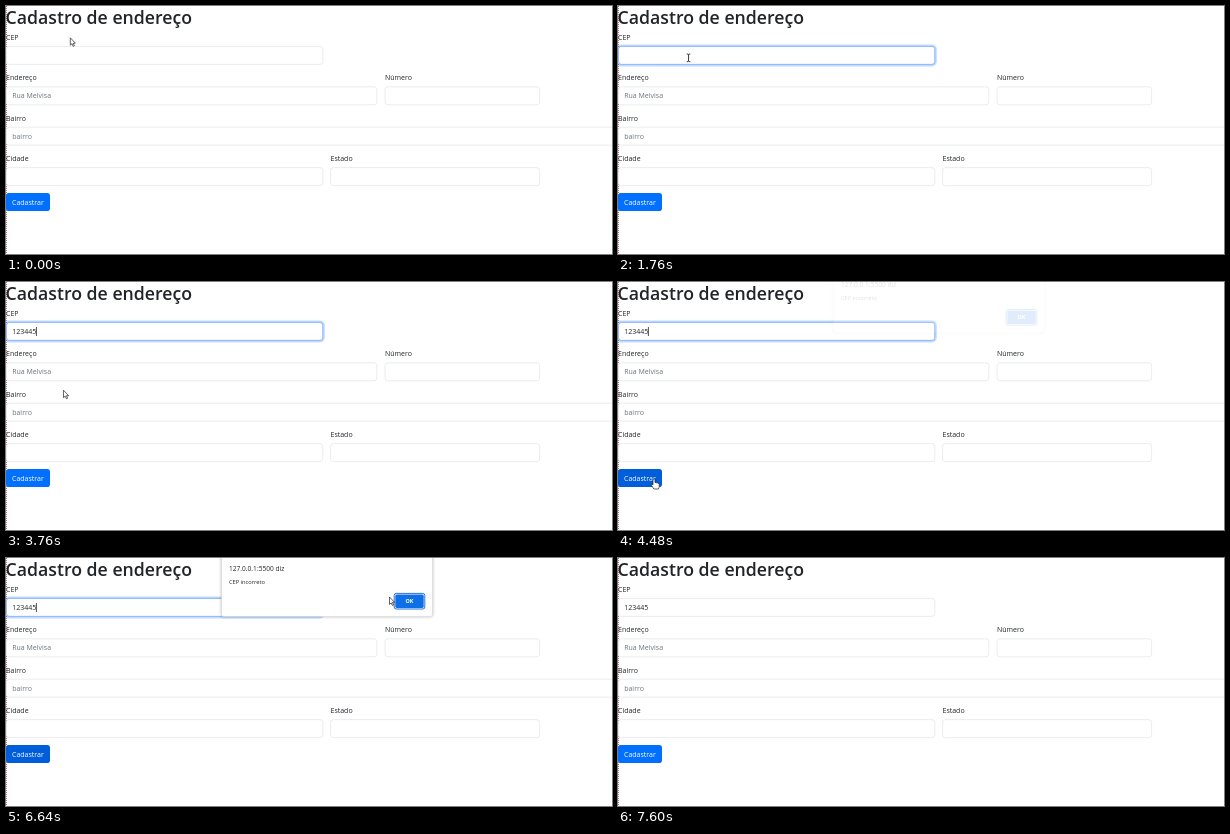
An HTML page that plays this animation: 606x248 px, repeating every 7680 ms.

```html
<!DOCTYPE html>
<html lang="pt-BR">
<head>
<meta charset="utf-8">
<title>Cadastro de endereço</title>
<style>
  html, body { margin: 0; width: 606px; height: 248px; overflow: hidden; background: #fff; }
  svg { display: block; }
  text { font: 7px "Open Sans", "Noto Sans", sans-serif; fill: #212529; }
  .title { font-size: 17.7px; font-weight: 600; }
  .hint { fill: #6c757d; }
  .field { fill: #fff; stroke: #e4e7ea; stroke-width: .8; }
  .light { fill: #fff; }
  .ok { font-size: 5.4px; font-weight: 700; text-anchor: middle; }
  #dialog { filter: drop-shadow(0 .6px 1.4px rgba(0, 0, 0, .28)); }
  #arrow, #hand { fill: #fff; stroke: #222; stroke-width: .7; stroke-linejoin: round; }
  #beam { fill: none; stroke: #222; stroke-width: .9; }
</style>
</head>
<body>
<svg width="606" height="248" viewBox="0 0 606 248">
  <path d="M.5 0V248" stroke="#b5787c" stroke-dasharray="1 1"/>
  <text class="title" x="-.4" y="18">Cadastro de endereço</text>

  <text x="0" y="34">CEP</text>
  <text x="0" y="74.4">Endereço</text>
  <text x="379" y="74.4">Número</text>
  <text x="0" y="114.8">Bairro</text>
  <text x="0" y="155.2">Cidade</text>
  <text x="324.5" y="155.2">Estado</text>

  <rect class="field" x=".4" y="40.4" width="316.4" height="18" rx="2.8"/>
  <rect class="field" x=".4" y="80.8" width="370.4" height="18" rx="2.8"/>
  <rect class="field" x="379" y="80.8" width="154.6" height="18" rx="2.8"/>
  <rect class="field" x=".4" y="121.2" width="620" height="18" rx="2.8"/>
  <rect class="field" x=".4" y="161.6" width="316.4" height="18" rx="2.8"/>
  <rect class="field" x="324.6" y="161.6" width="209" height="18" rx="2.8"/>

  <g id="ring" fill="none">
    <rect x="-.6" y="39.4" width="318.4" height="20" rx="3.8" stroke="#0d6efd" stroke-opacity=".25" stroke-width="2"/>
    <rect x=".4" y="40.4" width="316.4" height="18" rx="2.8" stroke="#86b7fe" stroke-width=".9"/>
  </g>
  <text id="cep" x="6.2" y="52.2"></text>
  <path id="caret" stroke="#222" stroke-width=".8"/>
  <text class="hint" x="6.2" y="92.4">Rua Melvisa</text>
  <text class="hint" x="6.2" y="132.8">bairro</text>

  <rect id="submit" y="187" width="44" height="18" rx="2.8"/>
  <text class="light" x="6" y="198.8">Cadastrar</text>

  <g id="dialog">
    <rect x="215.5" y="-12" width="211" height="70.6" rx="2.5" fill="#fff" stroke="#d4d7da" stroke-width=".6"/>
    <text x="223" y="12.6" style="font-size:6.6px">127.0.0.1:5500 diz</text>
    <text x="223" y="26" style="font-size:5.7px">CEP incorreto</text>
    <rect x="388.2" y="35.4" width="30.6" height="15.6" rx="2" fill="#fff" stroke="#1263d6" stroke-width=".9"/>
    <rect x="389.3" y="36.5" width="28.4" height="13.4" rx="1.4" fill="#0f6fe6"/>
    <text class="light ok" x="403.4" y="45.2">OK</text>
  </g>

  <g id="cursor">
    <path id="arrow" d="M0 0V7.4L1.7 5.9L2.9 8.5L4.1 8L2.9 5.4H5.1Z"/>
    <path id="beam" d="M-1.8-3.8H-.5L0-3.3L.5-3.8H1.8M0-3.3V3.3M-1.8 3.8H-.5L0 3.3L.5 3.8H1.8"/>
    <path id="hand" d="M-1 5V.5Q0-.8 1 .5V3.6Q2.3 3 2.7 3.9Q3.8 3.4 4.2 4.5Q5.3 4.2 5.3 5.6V7.2Q5.2 8.6 4.4 10H-.2Q-1.2 8-2.9 6Q-2.6 4.4-1 5.8Z" transform="translate(0 -1)"/>
  </g>
</svg>
<script>
const LOOP = 7680, STEP = 80;
const FOCUS = 1120, OPEN = 4450, CLOSE = 7120;
const keys = [1920, 2240, 2560, 2880, 3120, 3360];
const value = "123445";
// Pointer stops: time, x, y
const route = [
  [240, 64.3, 31.8], [720, 70.5, 52], [1700, 70.5, 52], [2100, 71.5, 50], [3520, 71.5, 50],
  [4080, 36, 198], [4880, 36, 198], [5440, 290.5, 28], [5760, 290.5, 28],
  [6320, 383.5, 39], [6680, 383.5, 39], [6920, 400, 43]
];

const $ = id => document.getElementById(id);
const ramp = (t, start, length) => Math.min(1, Math.max(0, (t - start) / length));
const show = (id, on) => $(id).setAttribute("visibility", on ? "visible" : "hidden");

function pointer(t) {
  const i = route.findIndex(stop => stop[0] > t);
  if (i < 0) return route.at(-1).slice(1);
  if (i === 0) return route[0].slice(1);
  const [t0, x0, y0] = route[i - 1], [t1, x1, y1] = route[i];
  const p = ramp(t, t0, t1 - t0), e = p * p * (3 - 2 * p);
  return [x0 + (x1 - x0) * e, y0 + (y1 - y0) * e];
}

function draw(t) {
  const modal = t >= OPEN && t < CLOSE;
  const [x, y] = pointer(t);
  const overField = !modal && x < 317 && y > 40 && y < 59;
  const overButton = x < 44 && y > 187 && y < 205;

  const typed = keys.filter(k => k <= t).length;
  $("cep").textContent = value.slice(0, typed);
  $("ring").setAttribute("opacity", ramp(t, FOCUS, 150) - ramp(t, CLOSE, 150));

  const since = t - (typed ? keys[typed - 1] : FOCUS);
  const caretX = 6.4 + (typed ? $("cep").getComputedTextLength() : 0);
  $("caret").setAttribute("d", `M${caretX} 45V54`);
  show("caret", t >= FOCUS && t < CLOSE && (modal || since % 1000 < 500));

  const hover = ramp(t, 3980, 150) - ramp(t, CLOSE, 200);
  const mix = (a, b) => Math.round(a + (b - a) * hover);
  $("submit").setAttribute("fill", `rgb(${mix(2, 0)},${mix(112, 94)},${mix(255, 219)})`);

  const rise = ramp(t, OPEN, 240), fade = ramp(t, CLOSE, 200);
  $("dialog").setAttribute("opacity", rise - fade);
  $("dialog").setAttribute("transform", `translate(0 ${-9 * (1 - rise + fade)})`);

  const visible = t < CLOSE + 160;
  $("cursor").setAttribute("transform", `translate(${x} ${y})`);
  show("beam", visible && overField);
  show("hand", visible && overButton);
  show("arrow", visible && !overField && !overButton);
}

function frame() {
  const t = performance.now() % LOOP;
  draw(Math.floor(t / STEP) * STEP);
  requestAnimationFrame(frame);
}
frame();
</script>
</body>
</html>
```
